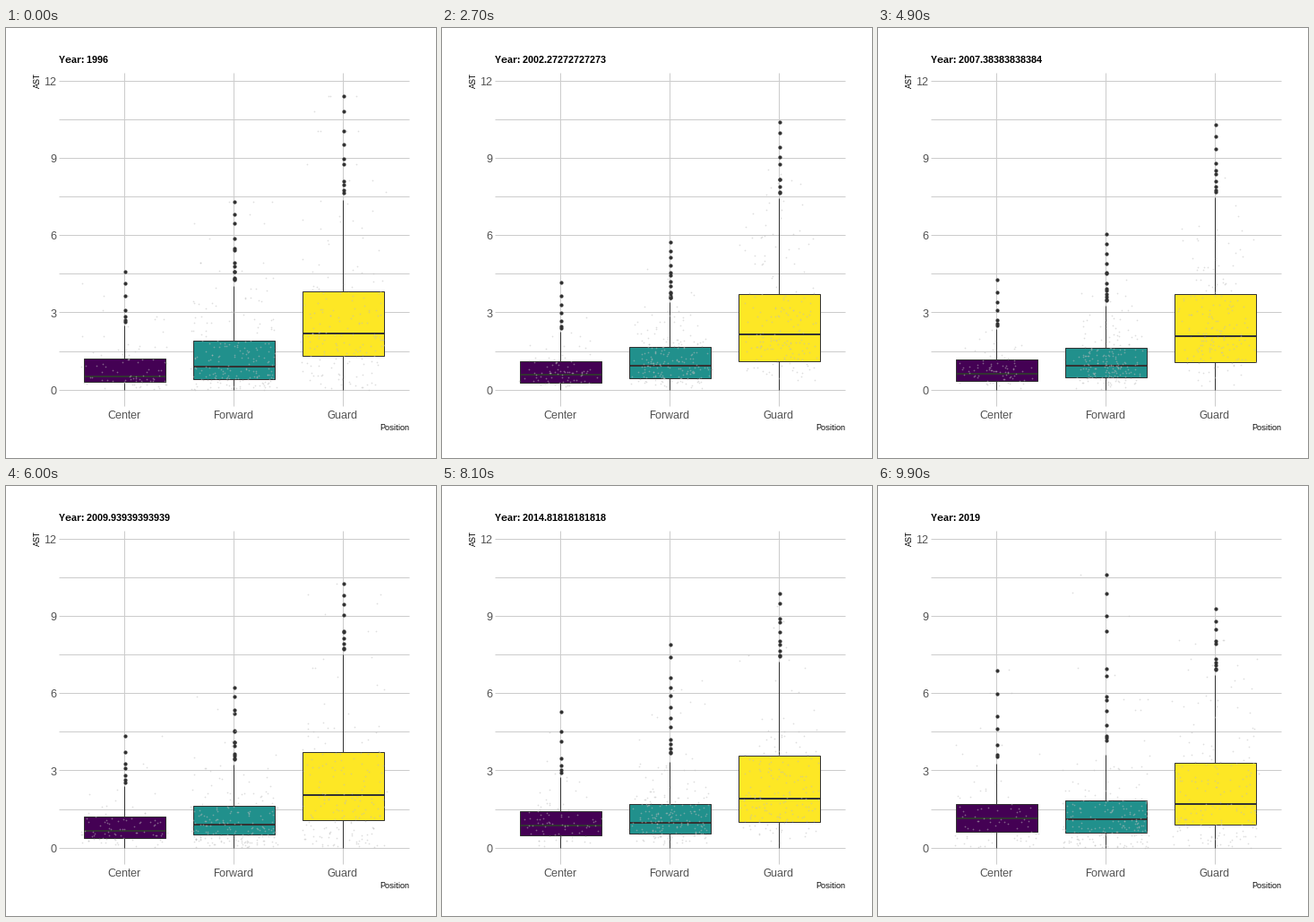
A matplotlib script that plays this animation: 480 by 480 pixels, repeating every 10000 ms.

```python
import numpy as np
import matplotlib.pyplot as plt
from matplotlib.animation import FuncAnimation
from matplotlib.patches import Rectangle

plt.rcParams["font.family"] = "Liberation Sans"
plt.rcParams["text.hinting"] = "no_autohint"
plt.rcParams["text.hinting_factor"] = 1

FRAMES, INTERVAL = 100, 100
FIRST, LAST = 1996, 2019
SEASONS = LAST - FIRST + 1
PX = 0.75                      # points per pixel at 96 dpi
UNIT, ZERO = 28.75, 403.7      # pixels per assist, pixel row of zero
BOX_W, JITTER = 91.6, 48.8
INK, GRID, GREY = "#333333", "#cccccc", "#4d4d4d"
KNOTS = [1996, 1998.6, 2012.5, 2019]

rng = np.random.default_rng(23)
season_frames = np.rint(np.linspace(0, FRAMES - 1, SEASONS)).astype(int)


def ypos(v):
    return ZERO - UNIT * np.asarray(v)


def year_at(i):
    return FIRST + (LAST - FIRST) * i / (FRAMES - 1)


def tween(seasons, i):
    """Linear blend between the two seasons around frame i."""
    j = min(np.searchsorted(season_frames, i, "right") - 1, SEASONS - 2)
    a, b = season_frames[j], season_frames[j + 1]
    t = (i - a) / (b - a)
    return (1 - t) * seasons[j] + t * seasons[j + 1]


class Group:
    """One box with whiskers, outliers and jittered players.

    curves holds q1, median, q3 and maximum at the KNOTS years.
    """

    def __init__(self, ax, name, x, color, curves, players, outliers):
        self.x, self.curves = x, curves
        # Outliers thin out upwards; inner ones shift a little each season.
        rank = np.linspace(0, 1, outliers)
        wobble = rng.uniform(-0.08, 0.08, (SEASONS, outliers))
        self.ranks = rank + wobble * np.sin(np.pi * rank)
        self.clouds = [self.cloud(i, players) for i in season_frames]

        line = dict(color=INK, solid_capstyle="butt")
        self.upper, = ax.plot([x, x], [0, 0], lw=PX, zorder=2, **line)
        self.lower, = ax.plot([x, x], [0, 0], lw=PX, zorder=2, **line)
        self.dots = ax.scatter([], [], s=(4.2 * PX) ** 2, color=INK, lw=0,
                               zorder=2)
        left = x - BOX_W / 2
        self.box = ax.add_patch(Rectangle((left, 0), BOX_W, 0, fc=color,
                                          ec=INK, lw=PX, zorder=3))
        self.median, = ax.plot([left, left + BOX_W], [0, 0], lw=2 * PX,
                               zorder=4, **line)
        self.points, = ax.plot([], [], "o", ms=1.7 * PX, mew=0,
                               color="#bebebe", alpha=0.5, zorder=5)
        ax.text(x - 0.5, 436, name, size=12 * PX, color=GREY, ha="center")

    def stats(self, i):
        q1, med, q3, peak = (np.interp(year_at(i), KNOTS, c)
                             for c in self.curves)
        top = q3 + 1.42 * (q3 - q1)
        start = top + 0.08 * (peak - top)
        out = start + (peak - start) * tween(self.ranks, i) ** 1.8
        return q1, med, q3, top, out

    def cloud(self, i, players):
        """Players of one season, drawn from its quantiles."""
        q1, med, q3, top, out = self.stats(i)
        u = rng.random(players)
        v = np.interp(u, [0, .25, .5, .75, .87, .94],
                      [0, q1, med, q3, q3 + .42 * (top - q3), top])
        v = np.where(u > .94, rng.choice(out, players), v)
        return np.array([self.x + rng.uniform(-JITTER, JITTER, players),
                         ypos(v)])

    def draw(self, i):
        *box, out = self.stats(i)
        q1, med, q3, top = ypos(box)
        self.upper.set_ydata([top, q3])
        self.lower.set_ydata([q1, ZERO])
        self.box.set_y(q3)
        self.box.set_height(q1 - q3)
        self.median.set_ydata([med + 0.5] * 2)
        self.dots.set_offsets([(self.x + 0.1, y + 0.5) for y in ypos(out)])
        self.points.set_data(*tween(self.clouds, i))


fig = plt.figure(figsize=(5, 5), dpi=96, facecolor="white")
ax = fig.add_axes([0, 0, 1, 1])
ax.set_xlim(0, 480)
ax.set_ylim(480, 0)
ax.axis("off")

columns = 132.4 + 122 * np.arange(3)
grid = dict(color=GRID, lw=PX, zorder=1, solid_capstyle="butt")
for v in np.arange(0, 12.1, 1.5):
    y = ypos(v)
    ax.plot([59, 450], [y, y], **grid)
    if v % 3 == 0:
        ax.text(56.5, y + 5.3, f"{v:.0f}", size=12 * PX, color=GREY,
                ha="right")
for x in columns:
    ax.plot([x, x], [50, 422], **grid)

groups = [
    Group(ax, "Center", columns[0], "#440154",
          [(.3, .23, .41, .61), (.54, .55, .7, 1.16),
           (1.2, 1.03, 1.25, 1.7), (4.6, 4.1, 4.4, 6.9)], 85, 7),
    Group(ax, "Forward", columns[1], "#21908c",
          [(.41, .44, .51, .59), (.91, .95, .92, 1.12),
           (1.9, 1.7, 1.6, 1.84), (7.3, 5.5, 6.4, 10.6)], 205, 13),
    Group(ax, "Guard", columns[2], "#fde725",
          [(1.3, 1.14, 1.04, .9), (2.2, 2.2, 2.02, 1.72),
           (3.8, 3.72, 3.72, 3.3), (11.4, 10.5, 10.2, 9.3)], 180, 10),
]
title = ax.text(59, 39, "", size=11 * PX, weight="bold", color="black")
ax.text(450, 449, "Position", size=9 * PX, color="black", ha="right")
ax.text(38, 50, "AST", size=9 * PX, color="black", rotation=90,
        rotation_mode="anchor", ha="right", va="baseline")


def update(i):
    title.set_text(f"Year: {year_at(i):.15g}")
    for group in groups:
        group.draw(i)
    return []


anim = FuncAnimation(fig, update, frames=FRAMES, interval=INTERVAL,
                     repeat=True, repeat_delay=0, blit=False)
plt.show()
```
